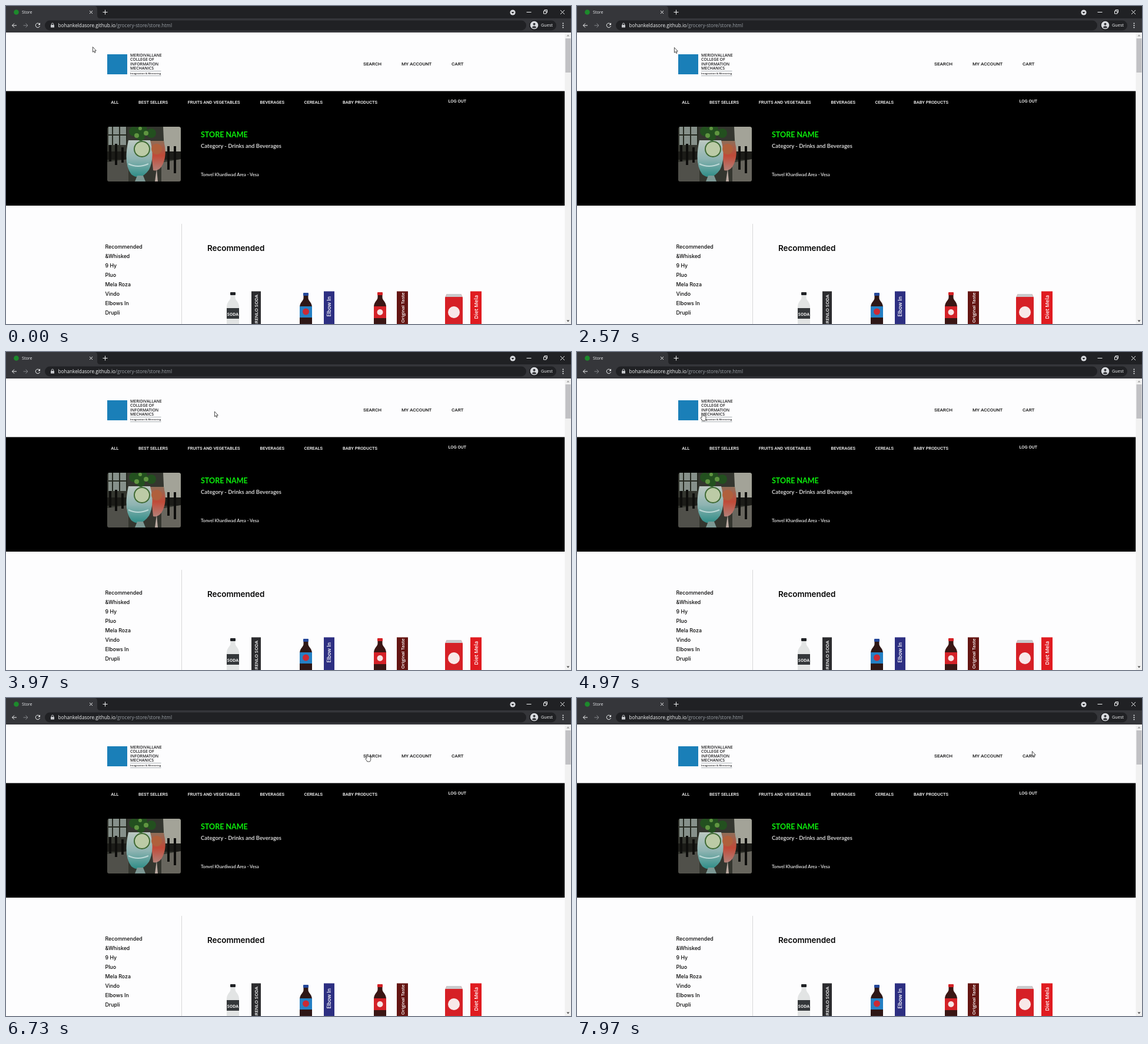
Write an HTML page that moves like this. It is 960 by 540 pixels and loops after 8 s.

```html
<!DOCTYPE html>
<html lang="en">
<head>
<meta charset="utf-8">
<title>Store</title>
<style>
html, body { margin: 0; width: 100%; height: 100%; overflow: hidden; background: #fdfdfe; }
svg { display: block; width: 960px; height: 540px; }
text { white-space: pre; }
.ui { font-family: "Open Sans", "Noto Sans", sans-serif; }
.nav { font: 500 8.1px Roboto, sans-serif; fill: #111; }
.menu { font: 500 7.5px Roboto, sans-serif; fill: #fff; }
.lato { font-family: Lato, sans-serif; font-weight: 700; }
.list { font: 500 8.8px Inter, sans-serif; fill: #080808; }
.tag { font-family: "Open Sans", sans-serif; font-weight: 600; fill: #fff; text-anchor: end; }
.line { fill: none; stroke: #f1f3f4; stroke-width: 1; }
</style>
</head>
<body>
<svg viewBox="0 0 960 540">
  <defs>
    <path id="bottle" d="M-4 4V9C-4 14-10.5 16-10.5 25V55H10.5V25C10.5 16 4 14 4 9V4Z"/>
    <clipPath id="photo"><rect x="172" y="205" width="125" height="93" rx="3.5"/></clipPath>
    <linearGradient id="mint" x2="0" y2="1">
      <stop offset="0" stop-color="#bcc8c2"/><stop offset=".5" stop-color="#8fb4b2"/><stop offset="1" stop-color="#2d8c86"/>
    </linearGradient>
    <linearGradient id="peach" x2="0" y2="1">
      <stop offset="0" stop-color="#8f6e58"/><stop offset=".5" stop-color="#c04a38"/><stop offset="1" stop-color="#b48078"/>
    </linearGradient>
  </defs>

  <!-- browser window -->
  <g class="ui">
    <rect width="960" height="22" fill="#202124"/>
    <path d="M0 21V0H150Q155 0 155 5V16Q155 21 160 21H960V45H0Z" fill="#35363a"/>
    <circle cx="17.5" cy="10.5" r="4.3" fill="#1d8a2c"/>
    <text x="27" y="13" font-size="7.2" fill="#e8eaed">Store</text>
    <path class="line" d="M142 8l5 5m0-5l-5 5M164.5 10.5h8m-4-4v8M884.5 10.5h8M942 7l7 7m0-7l-7 7"/>
    <path class="line" d="M913.5 8.5h4.5v4.500h-4.500zM915 8V6.500h4.500V11H918"/>
    <circle cx="861" cy="11" r="4.600" fill="#dadce0"/>
    <path d="M858.500 10h5l-2.500 3z" fill="#202124"/>

    <path class="line" d="M18 33h-7.500m3.500-3.500L10.500 33l3.500 3.500"/>
    <path class="line" d="M29.500 33h7.500m-3.500-3.500L37 33l-3.500 3.500" style="stroke:#85878b"/>
    <path class="line" d="M57 30.700A3.700 3.700 0 1 0 57.500 34"/>
    <path d="M58 28.500v3.700h-3.700z" fill="#f1f3f4"/>
    <rect x="66" y="24.500" width="818" height="17" rx="8.500" fill="#202124"/>
    <rect x="76" y="32" width="6" height="4.500" rx=".5" fill="#c6c8cc"/>
    <path d="M77.300 32v-1.200a1.700 1.700 0 0 1 3.400 0V32" fill="none" stroke="#c6c8cc"/>
    <text x="88.500" y="36" font-size="8.200" fill="#f1f3f4">bohankeldasore.github.io<tspan fill="#9aa0a6">/grocery-store/store.html</tspan></text>
    <rect x="889" y="24.500" width="46" height="17" rx="8.500" fill="#202124"/>
    <circle cx="897.500" cy="32.500" r="6.800" fill="#dadce0"/>
    <circle cx="897.500" cy="30.700" r="2" fill="#35363a"/>
    <path d="M893.500 36.200q4-4.200 8 0q-4 3-8 0z" fill="#35363a"/>
    <text x="909" y="35.300" font-size="7.300" fill="#f1f3f4">Guest</text>
    <g fill="#f1f3f4"><circle cx="946.500" cy="29.500" r="1"/><circle cx="946.500" cy="33" r="1"/><circle cx="946.500" cy="36.500" r="1"/></g>
  </g>

  <!-- page -->
  <rect y="45" width="960" height="495" fill="#fdfdfe"/>
  <rect x="172" y="82" width="34" height="34" fill="#1a7fb8"/>
  <g class="ui" font-size="6.900" fill="#1c1c1e" font-weight="600">
    <text x="211" y="85.500">MERIDIVALLANE</text>
    <text x="211" y="93">COLLEGE OF</text>
    <text x="211" y="100.500">INFORMATION</text>
    <text x="211" y="108">MECHANICS</text>
    <text x="211" y="116" font-size="4.300">Imagination &amp; Mentoring</text>
  </g>
  <path d="M211 110.500H263.500M211 118.500H263.500" stroke="#8a9298" stroke-width=".7"/>
  <g class="nav">
    <text x="607" y="101.300">SEARCH</text>
    <text x="672" y="101.300">MY ACCOUNT</text>
    <text x="757" y="101.300">CART</text>
  </g>
  <rect y="144.500" width="949.500" height="194.500" fill="#000"/>
  <g class="menu">
    <text x="178.300" y="166.300">ALL</text>
    <text x="225" y="166.300">BEST SELLERS</text>
    <text x="308.700" y="166.300">FRUITS AND VEGETABLES</text>
    <text x="431.500" y="166.300">BEVERAGES</text>
    <text x="506.500" y="166.300">CEREALS</text>
    <text x="572" y="166.300">BABY PRODUCTS</text>
    <text x="751.500" y="164.300">LOG OUT</text>
  </g>

  <g clip-path="url(#photo)">
    <rect x="172" y="205" width="125" height="93" fill="#34362f"/>
    <path d="M174 205h31v31h-31z" fill="#86908a"/>
    <path d="M267 205h30v44h-28z" fill="#a3a398"/>
    <path d="M172 247h125v14h-125z" fill="#1c1c18"/>
    <path d="M172 265l36-5v40h-36z" fill="#50504a"/>
    <path d="M264 266l33-6v40h-33z" fill="#68665e"/>
    <path d="M177 236v28m10-30v36m11-30v26M276 238v40m11-40v46" stroke="#0e0e0c" stroke-width="4"/>
    <path d="M181 205v31m12-31v31m12-31v31M174 219h31" stroke="#24281f" stroke-width="2"/>
    <path d="M245 229h23q7 27-4 44q-6 8-14 6z" fill="url(#peach)"/>
    <path d="M256 276l2 22h-5z" fill="#b9a8a0"/>
    <path d="M208 228h37q8 30-2 50q-14 20-30 8q-14-18-5-58z" fill="url(#mint)"/>
    <path d="M223 288h10l4 10h-18z" fill="#7c9894"/>
    <g fill="#23501f">
      <circle cx="217" cy="213" r="8"/><circle cx="231" cy="210" r="9"/><circle cx="247" cy="216" r="8"/><circle cx="229" cy="222" r="7"/>
    </g>
    <g fill="#5f9540"><circle cx="222" cy="220" r="4"/><circle cx="238" cy="216" r="4"/><circle cx="228" cy="208" r="3"/></g>
    <circle cx="256" cy="243" r="9" fill="#b0603c"/>
    <circle cx="231" cy="243" r="13" fill="#bccba6" stroke="#3f6a34" stroke-width="2"/>
    <path d="M208 268q16 8 34 0" stroke="#bcd8d6" stroke-width="2" fill="none"/>
  </g>

  <g class="lato">
    <text x="331" y="222.700" font-size="12.500" fill="#0cf20c">STORE NAME</text>
    <text x="331" y="241.200" font-size="9.450" fill="#cfcfcf">Category - Drinks and Beverages</text>
    <text x="331" y="288.500" font-size="7.500" fill="#d2d2d2">Tonvel Khardiwad Area - Vesa</text>
  </g>

  <path d="M298.500 370V540" stroke="#d8d8d8"/>
  <g class="list" id="list"></g>
  <text x="342" y="415.500" font-family="Inter, sans-serif" font-size="13.400" font-weight="600" fill="#050505">Recommended</text>

  <!-- products -->
  <g transform="translate(385.500 486)">
    <use href="#bottle" fill="#e2e4e4"/>
    <rect x="-4.500" width="9" height="5" rx="1" fill="#202226"/>
    <rect x="-10.500" y="27" width="21" height="18" fill="#34373a"/>
    <text class="ui" y="40" font-size="7" font-weight="700" fill="#f0f0f0" text-anchor="middle">SODA</text>
  </g>
  <g transform="translate(509.500 487)">
    <use href="#bottle" fill="#2e1716"/>
    <rect x="-4.500" width="9" height="5" rx="1" fill="#24489a"/>
    <rect x="-10.500" y="23" width="21" height="19" fill="#2580c4"/>
    <circle cy="32" r="5.500" fill="#cc2a34"/>
  </g>
  <g transform="translate(635.500 486)">
    <use href="#bottle" fill="#3a1614"/>
    <rect x="-4.500" width="9" height="5" rx="1" fill="#d42024"/>
    <rect x="-10.500" y="24" width="21" height="20" fill="#d42228"/>
    <circle cy="34" r="5" fill="#f6e4e4"/>
  </g>
  <path d="M749 489h24l3 6v45h-30v-45z" fill="#d62026"/>
  <path d="M749 489h24l2.500 5h-29z" fill="#c8cacc"/>
  <circle cx="761" cy="520" r="10" fill="#f8e8e8"/>
  <g id="tags"></g>

  <!-- scrollbar -->
  <rect x="949.500" y="45" width="10.500" height="495" fill="#f1f1f1"/>
  <rect x="950.500" y="55" width="9" height="58" fill="#c1c1c4"/>
  <path d="M952.500 51.500l2.500-3 2.500 3z" fill="#a3a3a3"/>
  <path d="M952.500 533.500l2.500 3 2.500-3z" fill="#505050"/>

  <g id="cursor" stroke="#222" stroke-width=".8" stroke-linejoin="round" fill="#fff">
    <path id="arrow" d="M.4 0V8.700L2.300 7l1.300 2.900 1.400-.6L3.800 6.400H6.300Z"/>
    <path id="hand" d="M-1 6.500V.8Q0-.5 1 .8V4Q2 3.400 2.700 4.300Q3.700 3.700 4.300 4.700Q5.500 4.300 5.700 5.600V9Q5.500 11 4.300 12.500H-.2Q-1.200 10.500-3 8.200Q-3.300 6.700-2 6.900Z"/>
  </g>
</svg>
<script>
const NS = "http://www.w3.org/2000/svg";
const $ = id => document.getElementById(id);

function add(parent, name, attrs, text) {
  const el = document.createElementNS(NS, name);
  for (const k in attrs) el.setAttribute(k, attrs[k]);
  if (text) el.textContent = text;
  parent.append(el);
}

["Recommended", "&Whisked", "9 Hy", "Pluo", "Mela Roza", "Vindo", "Elbows In", "Drupli"]
  .forEach((name, i) => add($("list"), "text", { x: 168.5, y: 412.3 + 16 * i }, name));

// x, width, colour, text top, font size, label
[
  [417, 16, "#2b2b2e", 490, 7.8, "BRENLO SODA"],
  [540, 18, "#2d2f82", 493, 8.5, "Elbow In"],
  [664, 19, "#641512", 486.5, 7.8, "Original Taste"],
  [789, 19, "#e01b20", 491, 8.8, "Diet Mela"]
].forEach(([x, w, fill, top, size, label]) => {
  add($("tags"), "rect", { x, y: 484.5, width: w, height: 56, fill });
  add($("tags"), "text", {
    class: "tag", "font-size": size,
    transform: `translate(${x + w / 2 + 3} ${top}) rotate(-90)`
  }, label);
});

// pointer path: time, x, y
const path = [
  [0, 147, 69.5], [2540, 147, 69.5], [2570, 165, 70.5], [2700, 400, 102], [2830, 596, 151],
  [2970, 596, 151], [3130, 594, 269], [3340, 594, 269], [3600, 798, 285],
  [3770, 798, 285], [3970, 354, 101], [4130, 262, 98], [4300, 223, 97],
  [4540, 223, 97], [4670, 242, 107], [4840, 242, 107], [5030, 200, 103],
  [5270, 222, 111], [5530, 257, 97], [5770, 257, 97], [5830, 252, 99.5],
  [5970, 252, 99.5], [6200, 420, 112], [6430, 592, 104], [6540, 592, 104],
  [6730, 614, 95.5], [6900, 632, 97], [7130, 690, 98], [7370, 716, 94],
  [7500, 716, 94], [7970, 773, 90.5], [8000, 773, 90.5]
];

// clickable areas: left, top, right, bottom
const links = [[172, 79, 264, 119], [607, 93, 638, 105], [672, 93, 723, 105], [757, 93, 778, 105]];

function pointAt(t) {
  const i = Math.max(1, path.findIndex(p => p[0] >= t));
  const [t0, x0, y0] = path[i - 1], [t1, x1, y1] = path[i];
  const k = (t - t0) / (t1 - t0);
  return [x0 + (x1 - x0) * k, y0 + (y1 - y0) * k];
}

const start = performance.now();

function draw() {
  const t = (performance.now() - start) % 8000;
  const tick = Math.floor((t + 4) * 0.03);
  const [x, y] = pointAt(Math.min(8000, Math.round(tick * 10 / 3) * 10));
  const over = links.some(([l, a, r, b]) => x >= l && x <= r && y >= a && y <= b);
  $("cursor").setAttribute("transform", `translate(${x} ${y})`);
  $("arrow").style.display = over ? "none" : "";
  $("hand").style.display = over ? "" : "none";
  requestAnimationFrame(draw);
}
draw();
</script>
</body>
</html>
```
